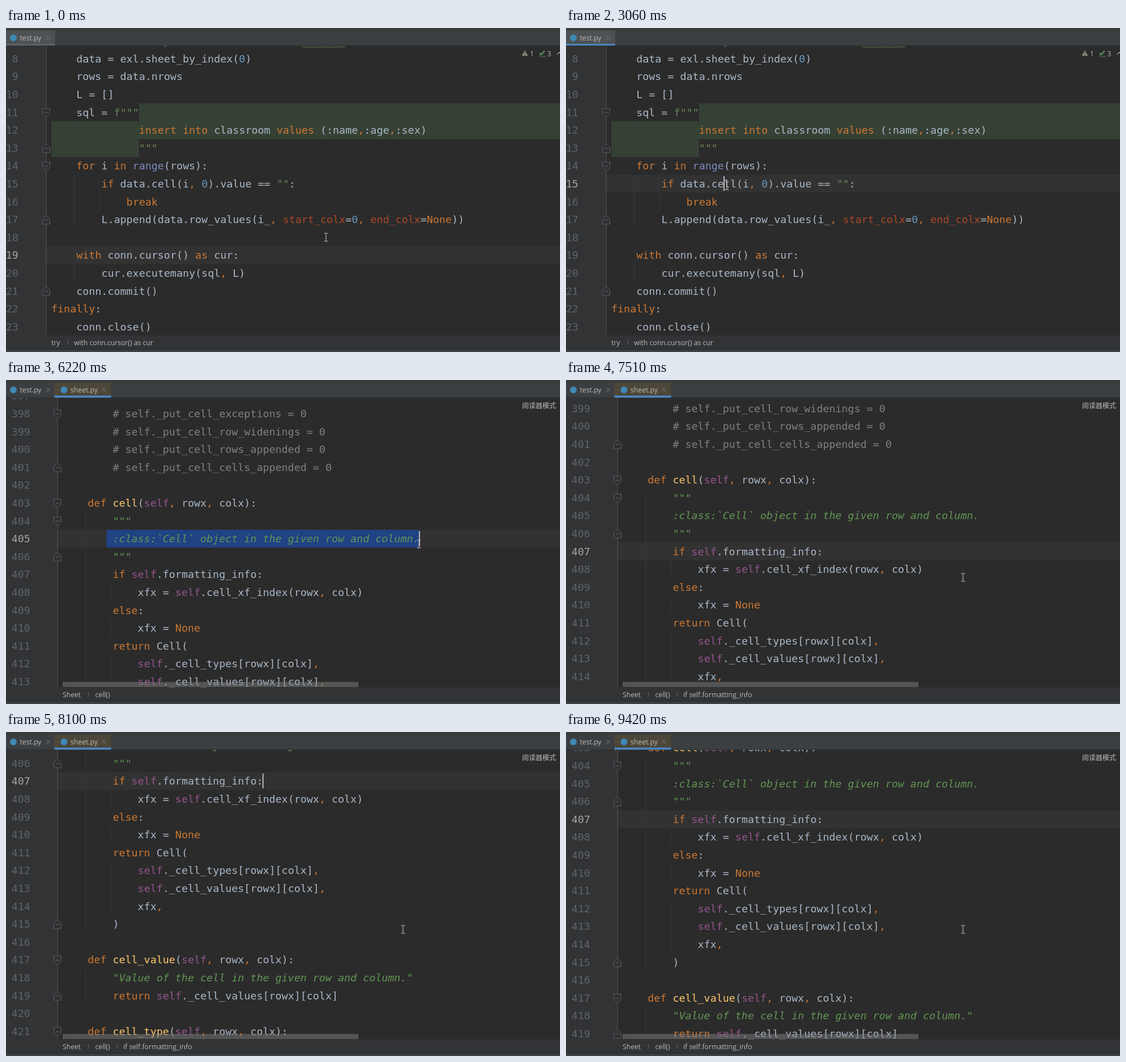
Write an HTML page that moves like this. It is 978 px wide and 573 px high and loops after 9.49 s.

```html
<!DOCTYPE html>
<html lang="en">
<head>
<meta charset="utf-8">
<title>Editor</title>
<style>
  html, body { margin: 0; width: 100%; height: 100%; overflow: hidden; background: #2b2b2b; }
  svg { display: block; width: 978px; height: 573px; }
  text { white-space: pre; fill: #a9b7c6; }
  .code text { font: 18.35px "DejaVu Sans Mono", "Noto Sans Mono", monospace; }
  .code .num { fill: #606366; text-anchor: end; }
  .code .num.on { fill: #a4a3a3; }
  .ui text { font: 12.2px "Open Sans", "Noto Sans", sans-serif; fill: #bbbbbb; }
  .ui .cjk { font: 12px "Noto Sans CJK SC", "Noto Sans CJK", sans-serif; }
  .kw { fill: #cc7832; } .str { fill: #6a8759; } .self { fill: #94558d; }
  .int { fill: #6897bb; } .arg { fill: #aa4926; } .fn { fill: #ffc66d; }
  .builtin { fill: #7f8abf; } .com { fill: #808080; }
  .doc { fill: #629755; font-style: italic; }
  .link.on { fill: #589df6; text-decoration: underline; }
  .guide { stroke: #3a3a3a; }
  .fold { fill: #2f3032; stroke: #5a5d60; }
  .off { display: none; }
</style>
</head>
<body>
<svg id="stage" viewBox="0 0 978 573"></svg>
<script>
const LOOP = 9490, LH = 31.6, CW = 11.05, BASE = 22.4;

const rect = (x, y, w, h, fill, extra = '') =>
  `<rect x="${x}" y="${y}" width="${w}" height="${h}" fill="${fill}" ${extra}/>`;
const line = (x1, y1, x2, y2, extra) =>
  `<line x1="${x1}" y1="${y1}" x2="${x2}" y2="${y2}" ${extra}/>`;
const label = (x, y, s, cls = '') => `<text x="${x}" y="${y}" class="${cls}">${s}</text>`;
const wave = (x1, x2, y, color) => {
  let d = `M${x1} ${y}`;
  for (let x = x1 + 2.75, up = 1; x <= x2; x += 2.75, up = -up) d += `L${x} ${y - up * 1.5 + 1.5}`;
  return `<path d="${d}" fill="none" stroke="${color}"/>`;
};

const views = {
  test: {
    x0: 80, gutter: 71, numX: 21.8, first: 7, top: 6.8,
    lines: [
      ' '.repeat(18) + 'p' + ' '.repeat(40) + ',' + ' '.repeat(12) + '(',
      '    data = exl.sheet_by_index(0)',
      '    rows = data.nrows',
      '    L = []',
      '    sql = f"""',
      '              insert into classroom values (:name,:age,:sex)',
      '              """',
      '    for i in range(rows):',
      '        if data.cell(i, 0).value == "":',
      '            break',
      '        L.append(data.row_values(i , start_colx=0, end_colx=None))',
      '',
      '    with conn.cursor() as cur:',
      '        cur.executemany(sql, L)',
      '    conn.commit()',
      'finally:',
      '    conn.close()'
    ],
    open: [11, 14], close: [13, 17, 21],
    guides: [[4, 12, 13], [4, 15, 17], [8, 16, 16], [4, 20, 20]],
    inject: [[11, 14, 90], [12, 0, 90], [13, 0, 14]]
  },
  sheet: {
    x0: 100, gutter: 91, numX: 42.8, first: 397, top: 12,
    lines: [
      '',
      '        # self._put_cell_exceptions = 0',
      '        # self._put_cell_row_widenings = 0',
      '        # self._put_cell_rows_appended = 0',
      '        # self._put_cell_cells_appended = 0',
      '',
      '    def cell(self, rowx, colx):',
      '        """',
      '        :class:`Cell` object in the given row and column.',
      '        """',
      '        if self.formatting_info:',
      '            xfx = self.cell_xf_index(rowx, colx)',
      '        else:',
      '            xfx = None',
      '        return Cell(',
      '            self._cell_types[rowx][colx],',
      '            self._cell_values[rowx][colx],',
      '            xfx,',
      '        )',
      '',
      '    def cell_value(self, rowx, colx):',
      '        "Value of the cell in the given row and column."',
      '        return self._cell_values[rowx][colx]',
      '',
      '    def cell_type(self, rowx, colx):',
      '        """'
    ],
    open: [398, 403, 404, 417, 421, 422], close: [401, 406, 415, 419],
    guides: [[4, 404, 415], [8, 408, 408], [8, 410, 410], [8, 412, 414], [4, 418, 419], [4, 422, 422]],
    inject: []
  }
};

const kinds = ['com', 'fn', 'link', 'kw', 'self', 'builtin', 'arg', 'int', 'str'];
const token = /(#.*)|((?<=def )\w+)|((?<=data\.)cell)|\b(def|if|else|return|for|in|with|as|break|finally|None|insert|into|values)\b|\b(self)\b|\b(range)\b|(\b(?:start|end)_colx)|\b(\d+)|(f?"""|"")|,/g;

function paint(src, isDoc) {
  if (isDoc) return `<tspan class="doc">${src}</tspan>`;
  return src.replace(token, (m, ...groups) => {
    const i = groups.slice(0, kinds.length).findIndex(g => g !== undefined);
    return `<tspan class="${i < 0 ? 'kw' : kinds[i]}">${m}</tspan>`;
  });
}

function fold(x, y, dir) {
  const p = [[-6.5, -7.5], [6.5, -7.5], [6.5, 2], [0, 8], [-6.5, 2]];
  return `<polygon class="fold" points="${p.map(([a, b]) => [x + a, y + b * dir])}"/>` +
    line(x - 3, y, x + 3, y, 'stroke="#66696c"');
}

function editor(name) {
  const v = views[name];
  const rowY = n => v.top + (n - v.first) * LH;
  const colX = c => v.x0 + c * CW;
  Object.assign(v, { rowY, colX });
  let s = rect(0, 31, v.gutter, 513, '#313335') +
    `<g class="scroll">` + rect(v.gutter, 0, 978, LH, '#323232', 'class="row"');
  for (const [n, a, b] of v.inject) s += rect(colX(a), rowY(n), (b - a) * CW, LH + .2, '#364135');
  for (const [c, a, b] of v.guides)
    s += line(colX(c) - 3.5, rowY(a), colX(c) - 3.5, rowY(b + 1), 'class="guide"');
  if (name === 'sheet') {
    s += rect(colX(8), rowY(403) + 1, 4 * CW, LH - 2, '#344134', 'class="ident"');
    s += rect(colX(7), rowY(405), 0, LH, '#214283', 'class="sel"');
  }
  s += line(v.gutter, 0, v.gutter, 900, 'stroke="#555759"');
  v.lines.forEach((src, i) => {
    const n = v.first + i, y = rowY(n) + BASE, body = src.trimStart();
    const isDoc = name === 'sheet' && /^[":]/.test(body);
    s += label(v.numX, y, n, 'num') +
      label(colX(src.length - body.length), y, paint(body, isDoc));
  });
  for (const n of v.open) s += fold(v.gutter, rowY(n) + LH / 2 + .7, 1);
  for (const n of v.close) s += fold(v.gutter, rowY(n) + LH / 2 + .7, -1);
  if (name === 'test') s += wave(521, 598, 32, '#5f8a55') + wave(455, 467, 347, '#8a8a8a');
  s += rect(0, 0, 1.7, 26, '#d0d0d0', 'class="caret"') + '</g>';
  return `<g id="${name}" class="code" clip-path="url(#pane)">${s}</g>`;
}

const tab = (x, name) =>
  `<circle cx="${x + 13}" cy="17.5" r="6" fill="#4088b3"/>` + label(x + 24.5, 22, name);
const cross = x =>
  `<path d="M${x - 3.5} 13.5l7 7m0-7l-7 7" stroke="#77797b" fill="none"/>`;
const chevron = x => `<path d="M${x - 1.5} 553l3 3.5-3 3.5" fill="none" stroke="#77797b"/>`;

document.getElementById('stage').innerHTML =
  `<defs><clipPath id="pane"><rect y="31" width="978" height="513"/></clipPath></defs>` +
  rect(0, 0, 978, 573, '#2b2b2b') + editor('test') + editor('sheet') +
  `<g class="ui">` +
  rect(0, 0, 978, 31, '#3c3f41') + rect(0, 3, 978, 1, '#323232') + rect(0, 30.5, 978, 1, '#323232') +
  rect(0, 543.5, 978, 25, '#313335') + rect(0, 568, 978, 1, '#282828') + rect(0, 569, 978, 4, '#3c3f41') +
  `<g id="testUi">` +
  rect(0, 4, 86.5, 27, '#4e5254') + rect(0, 28, 86.5, 3, '#5d6265', 'id="underline"') +
  `<path d="M916 39.5l5.5 9.5h-11z" fill="#8b8b78"/>` + rect(915.4, 42.5, 1.2, 3, '#2b2b2b') +
  rect(915.4, 46.5, 1.2, 1.2, '#2b2b2b') + label(925, 49.5, '1') +
  `<path d="M942 44l3 3 6-7" fill="none" stroke="#5c9a58" stroke-width="2"/>` +
  wave(941, 952, 49, '#5c9a58') + label(955.5, 49.5, '3') +
  `<path d="M973 47l4-4 4 4" fill="none" stroke="#a0a0a0" stroke-width="1.3"/>` +
  label(80, 561, 'try') + chevron(109) + label(120, 561, 'with conn.cursor() as cur') + `</g>` +
  `<g id="sheetUi">` +
  rect(85.5, 4, 100, 27, '#4c4739') + rect(85.5, 27.6, 100, 3.6, '#4a88c7') +
  tab(89.5, 'sheet.py') + cross(173) +
  rect(100, 534, 522, 9, '#808080', 'fill-opacity=".48"') +
  rect(890, 32, 88, 24, '#2b2b2b') +
  `<g id="reader">${label(911, 49.5, '阅读器模式', 'cjk')}</g>` +
  `<g id="busy">${label(864, 49.5, '阅读器模式', 'cjk')}${rect(935, 37, 1, 16, '#45474a')}${label(946.5, 49.5, '正在分析', 'cjk')}</g>` +
  label(100, 561, 'Sheet') + chevron(146) + label(157.5, 561, 'cell()') +
  `<g id="crumb">${chevron(196)}${label(207, 561, 'if self.formatting_info')}</g></g>` +
  tab(0, 'test.py') + cross(74.5) + `</g>` +
  `<path id="mouse" d="M-3.5-7h2.5l1 1 1-1h2.5M0-6V6M-3.5 7h2.5l1-1 1 1h2.5" fill="none" stroke="#bcbcbc" stroke-width="1.1"/>`;

// Bursts of change: start, end, number of steps.
const bursts = [[260, 1150, 13], [1220, 1900, 10], [3790, 4620, 13], [4750, 5590, 13],
  [6220, 6440, 4], [7380, 8300, 13], [9090, 9420, 5]];
const mouseKeys = [[190, 565, 370], [420, 480, 379], [1150, 228, 334], [1290, 224, 322],
  [1522, 235.5, 292], [1900, 284, 279], [3720, 284, 279], [4200, 157, 98], [4343, 145, 80],
  [4480, 146, 82], [4620, 150, 100], [4680, 150, 100], [5000, 174, 285], [5590, 729, 290],
  [6220, 729, 290], [6290, 735, 310], [6440, 701, 349]];
// Wheel ticks: start, end, rows.
const ticks = [[7305, 7640, 3], [7480, 7800, 3], [7735, 8255, 3], [9008, 9420, -3]];
const blinks = [3000, 3790, 4290, 4750, 5000, 7380, 7860, 8430, 8890, 9390];

function snap(t) {
  let held = 0;
  for (const [a, b, n] of bursts) {
    if (t < a) break;
    const step = (b - a) / (n - 1);
    held = t >= b ? b : a + Math.floor((t - a) / step + 1e-6) * step;
  }
  return held;
}

function mouseAt(t) {
  const i = mouseKeys.findIndex(k => k[0] > t);
  if (i === 0) return mouseKeys[0].slice(1);
  if (i < 0) return mouseKeys[mouseKeys.length - 1].slice(1);
  const [ta, xa, ya] = mouseKeys[i - 1], [tb, xb, yb] = mouseKeys[i];
  const p = (t - ta) / (tb - ta);
  return [xa + (xb - xa) * p, ya + (yb - ya) * p];
}

function scrollAt(t) {
  return ticks.reduce((sum, [a, b, rows]) => {
    const p = Math.min(1, Math.max(0, (t - a) / (b - a)));
    return sum + rows * LH * p * p * (3 - 2 * p);
  }, 0);
}

const $ = id => document.getElementById(id);
const show = (el, on) => el.classList.toggle('off', !on);
const parts = name => {
  const root = $(name), find = c => root.querySelector('.' + c);
  return { root, scroll: find('scroll'), row: find('row'), caret: find('caret'),
    sel: find('sel'), ident: find('ident'), link: find('link'), nums: [...root.querySelectorAll('.num')] };
};
const test = parts('test'), sheet = parts('sheet');

function place(p, v, n, col, visible) {
  p.row.setAttribute('y', v.rowY(n));
  p.caret.setAttribute('x', v.colX(col) - .8);
  p.caret.setAttribute('y', v.rowY(n) + 2.4);
  show(p.caret, visible);
  p.nums.forEach((el, i) => el.classList.toggle('on', v.first + i === n));
}

function draw(t) {
  const held = snap(t), [mx, my] = mouseAt(held);
  const inSheet = t >= 3260;
  const caretOn = blinks.filter(b => b <= t).length % 2 === 1;
  show(test.root, !inSheet);
  show($('testUi'), !inSheet);
  show(sheet.root, inSheet);
  show($('sheetUi'), inSheet);
  $('mouse').setAttribute('transform', `translate(${mx} ${my})`);

  if (!inSheet) {
    const clicked = t >= 3000;
    place(test, views.test, clicked ? 15 : 19, 18, clicked);
    test.link.classList.toggle('on', t >= 2500 && !clicked);
    $('underline').setAttribute('fill', clicked ? '#4a88c7' : '#5d6265');
    return;
  }

  const v = views.sheet, selecting = held >= 4990 && t < 6580;
  const end = Math.min(57, Math.max(7, Math.round((mx - v.x0) / CW)));
  const [n, col] = t >= 6580 ? [407, 32] : selecting ? [405, end] : [403, 8];
  place(sheet, v, n, col, caretOn);
  sheet.sel.setAttribute('width', selecting ? (end - 7) * CW : 0);
  show(sheet.ident, n === 403 && t >= 3330);
  sheet.scroll.setAttribute('transform', `translate(0 ${-scrollAt(held)})`);
  const analysing = t >= 3930 && t < 4890;
  show($('busy'), analysing);
  show($('reader'), !analysing);
  show($('crumb'), t >= 6780);
}

const start = performance.now();
function frame() {
  draw((performance.now() - start) % LOOP);
  requestAnimationFrame(frame);
}
frame();
</script>
</body>
</html>
```
